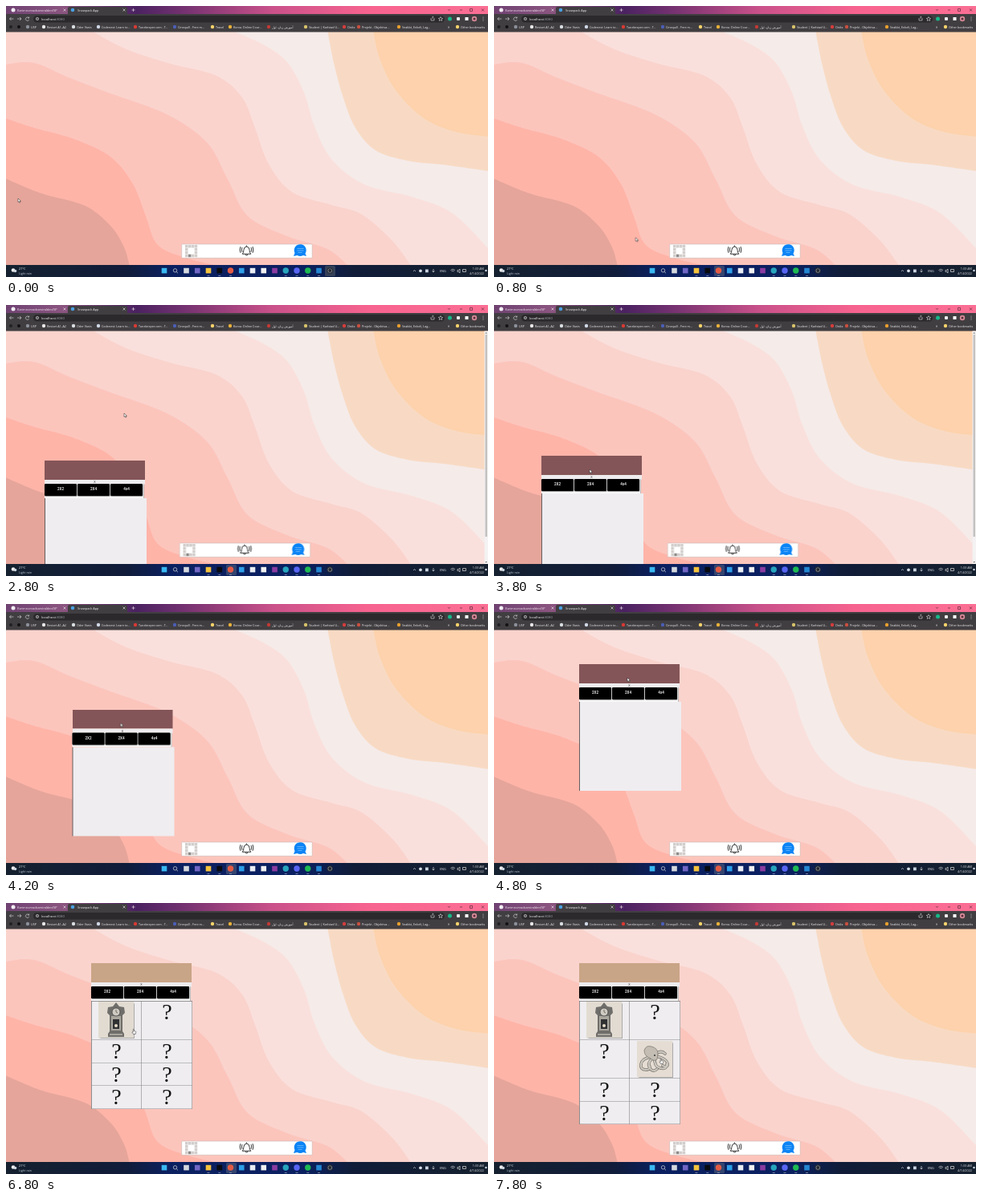
Write an HTML page that moves like this. It is 600 px wide and 338 px high and loops after 8 s.

```html
<!DOCTYPE html>
<html lang="en">
<head>
<meta charset="utf-8">
<title>Desktop memory game</title>
<style>
html, body { margin: 0; width: 100%; height: 100%; overflow: hidden; background: #0b1425; }
#stage { position: relative; width: 600px; height: 338px; overflow: hidden; font-family: "Open Sans", sans-serif; }
#stage > svg { position: absolute; inset: 0; }
text { font-family: "Open Sans", "DejaVu Sans", sans-serif; }
.page { position: absolute; top: 32px; left: 0; width: 600px; height: 291px; overflow: hidden; }
.anim, .window, .header, .board, .card, .blank { animation: 8s step-end infinite; }

.window { position: absolute; width: 127px; height: 157px; animation-name: drag; }
.window > * { position: absolute; box-sizing: border-box; }
.header { width: 125px; height: 23.5px; background: #c9a587; animation-name: press; }
.close { top: 23.5px; width: 125px; height: 6px; background: #eeecee;
  font: 4px/5.4px "Open Sans", sans-serif; text-align: center; color: #222; }
.sizes { top: 29px; width: 124px; height: 17.5px; background: #fafafa; border-right: 1px solid #bbb; }
.sizes b { position: absolute; top: .3px; width: 39.5px; height: 14.5px; border-radius: 1px; background: #000;
  box-shadow: .3px .7px 1px #777; color: #fff; font: 500 4.6px/14.5px Roboto, sans-serif; text-align: center; }
.blank { top: 46.5px; width: 127px; height: 111px; background: #efedf0; border-left: .7px solid #665f61; animation-name: clear; }
.board { top: 47px; width: 126px; display: grid; grid-template-columns: 63px 63px; background: #efedf0;
  box-shadow: inset .8px .8px #777; animation-name: rows; }
.cell { position: relative; box-shadow: inset -.6px -.6px #888;
  font: 28px/28px "Liberation Serif", serif; text-align: center; color: #111; }
.card { position: absolute; left: 9.3px; top: 1.3px; width: 44px; height: 45px; box-shadow: .5px .5px 1px #aaa; }
.clock { animation-name: first; }
.octopus { animation-name: second; }

.recorder { animation-name: recorder; }
.browser { animation-name: browser; }
.dock { animation-name: dock; }
.scrollbar { animation-name: scrollbar; }
.cursor { animation-name: cursor; }
.arrow { animation-name: arrow; }
.hand { animation-name: hand; }

@keyframes recorder { 0% { opacity: 1 } 2.5%, 100% { opacity: 0 } }
@keyframes browser { 0% { opacity: 0 } 2.5%, 100% { opacity: 1 } }
@keyframes dock { 0% { transform: none } 12.5% { transform: translateX(-2.5px) } 50%, 100% { transform: none } }
@keyframes scrollbar { 0% { opacity: 0 } 12.5% { opacity: 1 } 50%, 100% { opacity: 0 } }
@keyframes drag {
  0% { transform: translate(2px, 189px); visibility: hidden }
  12.5% { transform: translate(2px, 189px); visibility: visible }
  25% { transform: translate(22px, 177px) }
  30% { transform: translate(48px, 162px) }
  42.5% { transform: translate(59px, 156px) }
  47.5% { transform: translate(59px, 156px); animation-timing-function: steps(4) }
  57.5%, 100% { transform: translate(106px, 43px); visibility: visible }
}
@keyframes press { 0% { background: #c9a587 } 22.5% { background: #845558 } 75%, 100% { background: #c9a587 } }
@keyframes clear { 0% { opacity: 1 } 75%, 100% { opacity: 0 } }
@keyframes rows {
  0% { opacity: 0; grid-template-rows: 28.5px 28.5px 28.5px 28.5px }
  75% { opacity: 1; grid-template-rows: 28.5px 28.5px 28.5px 28.5px }
  82.5% { opacity: 1; grid-template-rows: 49px 28.5px 28.5px 28.5px }
  92.5%, 100% { opacity: 1; grid-template-rows: 49px 48px 28.5px 28.5px }
}
@keyframes first { 0% { opacity: 0 } 82.5%, 100% { opacity: 1 } }
@keyframes second { 0% { opacity: 0 } 92.5%, 100% { opacity: 1 } }
@keyframes arrow { 0% { opacity: 1 } 72.5%, 100% { opacity: 0 } }
@keyframes hand { 0% { opacity: 0 } 72.5%, 100% { opacity: 1 } }
@keyframes cursor {
  0% { transform: translate(15px, 240px) }
  2.5% { transform: translate(15px, 240px); animation-timing-function: steps(4) }
  12.5% { transform: translate(230px, 305px); animation-timing-function: steps(3) }
  20% { transform: translate(71px, 240px) }
  25% { transform: translate(91px, 228px) }
  30% { transform: translate(117px, 213px); animation-timing-function: steps(2) }
  35% { transform: translate(147px, 135px); animation-timing-function: steps(2) }
  40% { transform: translate(108px, 211px) }
  42.5% { transform: translate(119px, 205px) }
  47.5% { transform: translate(119px, 205px); animation-timing-function: steps(4) }
  57.5% { transform: translate(166px, 92px) }
  60% { transform: translate(166px, 92px); animation-timing-function: steps(5) }
  72.5% { transform: translate(167px, 110px) }
  75% { transform: translate(167px, 110px); animation-timing-function: steps(3) }
  82.5% { transform: translate(158px, 157px) }
  87.5% { transform: translate(158px, 157px); animation-timing-function: steps(2) }
  92.5%, 100% { transform: translate(207px, 194px) }
}
</style>
</head>
<body>
<div id="stage">
  <svg width="600" height="338">
    <defs>
      <linearGradient id="theme">
        <stop offset="0" stop-color="#6f4272"/><stop offset=".12" stop-color="#8b5580"/>
        <stop offset=".27" stop-color="#4b2261"/><stop offset=".36" stop-color="#70306f"/>
        <stop offset=".55" stop-color="#c9518a"/><stop offset=".75" stop-color="#f7638f"/><stop offset="1" stop-color="#fb6f94"/>
      </linearGradient>
      <linearGradient id="bar">
        <stop offset="0" stop-color="#15212f"/><stop offset=".25" stop-color="#101c3a"/>
        <stop offset=".34" stop-color="#0b2060"/><stop offset=".62" stop-color="#0b2060"/>
        <stop offset=".72" stop-color="#101c38"/><stop offset="1" stop-color="#16212f"/>
      </linearGradient>
    </defs>
    <rect y="32" width="600" height="292" fill="#fdd2ac"/>
    <g id="waves"></g>

    <rect width="600" height="11" fill="url(#theme)"/>
    <path d="M77 11V3q0-2 2-2h70q2 0 2 2v8z" fill="#413e41"/>
    <circle cx="9" cy="5" r="2.5" fill="#f0edf2"/>
    <circle cx="83" cy="5" r="2.3" fill="#4b9fe0"/>
    <g fill="none" stroke="#eee" stroke-width=".6">
      <path d="M71.500 3.500l3 3m0-3l-3 3M156.500 5h4m-2-2v4M145.500 3.500l3 3m0-3l-3 3"/>
      <path d="M550 4l1.500 1.500L553 4M565 5h3M577.500 3.500h3v3h-3zM592 3.500l3 3m0-3l-3 3" stroke="#42202e"/>
    </g>
    <rect y="10" width="600" height="22.500" fill="#413e41"/>
    <rect x="34" y="12" width="512" height="8.500" rx="4.200" fill="#2b292c"/>
    <g fill="none" stroke="#ddd" stroke-width=".6">
      <path d="M9.500 16h-5m2-2l-2 2 2 2M14 16h5m-2-2l2 2-2 2M28.500 15a2.200 2.200 0 1 0 .2 2m0-3.500V15H27"/>
      <circle cx="39" cy="16" r="1.700"/><path d="M39 15v2M529 15v3h4v-3m-2 1v-3l1.500 1M541 13.500l.8 1.700 1.900.2-1.400 1.200.4 1.900-1.700-1-1.700 1 .4-1.900-1.400-1.200 1.900-.2z"/>
    </g>
    <circle cx="552.500" cy="16" r="2.500" fill="#17b889"/>
    <rect x="561" y="14" width="4" height="4" rx="1" fill="#eee"/>
    <rect x="571.500" y="14" width="4" height="4" fill="#fff"/>
    <circle cx="583" cy="16" r="3.200" fill="#d98a98"/><circle cx="583" cy="16" r="1.500" fill="#59313d"/>
    <g fill="#ddd"><circle cx="594" cy="14" r=".5"/><circle cx="594" cy="16" r=".5"/><circle cx="594" cy="18" r=".5"/></g>
    <g id="marks"></g>

    <g class="anim scrollbar">
      <rect x="595.500" y="32.500" width="4.500" height="291" fill="#f4f2f2"/>
      <rect x="596.500" y="37" width="2.500" height="252" fill="#c4c1c1"/>
      <path d="M596.500 35.500h2.500l-1.250-1.500zM596.500 320h2.500l-1.250 1.500z" fill="#666"/>
    </g>
    <g class="anim dock">
      <rect x="218.700" y="297" width="162.500" height="17.300" rx=".7" fill="#fff" stroke="#c9b8b4" stroke-width=".6"/>
      <g id="memory"></g>
      <g fill="none" stroke="#222" stroke-width=".9" stroke-linecap="round">
        <path d="M294.500 309q1.400-1.200 1.400-4.500 0-4 3.600-4.500 3.600.5 3.600 4.500 0 3.300 1.400 4.500zM298.200 310.500q1.300 1.400 2.600 0M299.500 299v.7"/>
        <path d="M293.800 301.500q-1.300 2.500 0 5M291.800 300.500q-1.600 3.500 0 7M305.200 301.500q1.300 2.500 0 5M307.200 300.500q1.600 3.500 0 7"/>
      </g>
      <path d="M358 312l1.500-4a7.500 7.500 0 1 1 13 .7l1.500 3.300-4-1a7.500 7.500 0 0 1-7.500 0z" fill="#0b84f5"/>
      <path d="M362.500 302.500h8M362.500 305h8M363.500 307.500h5" stroke="#7fc0fb" stroke-width=".7"/>
    </g>

    <rect y="323" width="600" height="15" fill="url(#bar)"/>
    <circle cx="9" cy="329.500" r="2.300" fill="#eee"/><circle cx="11.500" cy="330.500" r="1.800" fill="#ccd4df"/>
    <rect class="anim recorder" x="397" y="324" width="13" height="13" rx="1.500" fill="#344057"/>
    <rect class="anim browser" x="274" y="324" width="13" height="13" rx="1.500" fill="#34456f"/>
    <g id="apps"></g>
    <g fill="none" stroke="#ddd" stroke-width=".7">
      <circle cx="210.500" cy="329.800" r="2.200"/><path d="M212.200 331.500l1.800 1.800M507 331l1.500-1.500 1.500 1.500"/>
      <path d="M532 328v4m-1.500-1.500l1.500 1.500 1.500-1.500M553.500 329.500q2.700-2.500 5.400 0M554.700 331q1.500-1.500 3 0M562 329.500h1.500l1.500-1.500v5l-1.500-1.500H562zM568.500 328.500h4v3h-4z"/>
    </g>
    <circle cx="516" cy="330.300" r="1.900" fill="#d6dce5"/><rect x="522" y="328.500" width="3.800" height="3.800" fill="#c9d2df"/>
    <circle cx="597.500" cy="330" r="1.200" fill="#dce2ec"/>
    <g id="labels"></g>
  </svg>

  <div class="page">
    <div class="window">
      <div class="blank"></div>
      <div class="board" id="board"></div>
      <div class="header"></div>
      <div class="close">X</div>
      <div class="sizes"><b style="left:.3px">2X2</b><b style="left:41.300px">2X4</b><b style="left:82.300px">4x4</b></div>
    </div>
  </div>

  <svg width="600" height="338">
    <g class="anim cursor" stroke="#222" stroke-width=".5" fill="#fff">
      <path class="anim arrow" d="M0 0v4.600l1.100-1 .8 1.700.9-.4-.8-1.600h1.500z"/>
      <path class="anim hand" d="M.2.600q.6-.9 1.100 0v2l2 .4q.7.300.4 1.500l-.5 2H.500L-1 4.200q.2-.8 1.200 0z"/>
    </g>
  </svg>
</div>

<script>
const byId = id => document.getElementById(id);
const label = (x, y, s, size = 3.9, fill = "#eeeef0", anchor = "start") =>
  `<text x="${x}" y="${y}" font-size="${size}" fill="${fill}" text-anchor="${anchor}">${s}</text>`;
const square = (x, y, size, fill) => `<rect x="${x}" y="${y}" width="${size}" height="${size}" fill="${fill}"/>`;
const dot = (x, y, r, fill) => `<circle cx="${x}" cy="${y}" r="${r}" fill="${fill}"/>`;

// Smooth curve through a few points
function curve(points) {
  const at = i => points[Math.max(0, Math.min(points.length - 1, i))];
  let d = `M${at(0)}`;
  for (let i = 0; i < points.length - 1; i++) {
    const handle = (a, b, c, sign) => [0, 1].map(k => at(a)[k] + sign * (at(c)[k] - at(b)[k]) / 6);
    d += `C${handle(i, i - 1, i + 1, 1)} ${handle(i + 1, i, i + 2, -1)} ${at(i + 1)}`;
  }
  return d;
}

const waves = [
  ["#f8dac4", [[457, 30], [465, 65], [485, 105], [520, 140], [560, 157], [601, 163]]],
  ["#f5ebe9", [[400, 30], [409, 75], [420, 115], [435, 152], [460, 180], [500, 193], [545, 198], [601, 206]]],
  ["#fae0dc", [[280, 30], [320, 48], [350, 70], [371, 108], [384, 150], [406, 192], [447, 223], [505, 238], [555, 258], [601, 303]]],
  ["#fad3cd", [[105, 30], [150, 54], [205, 72], [262, 87], [294, 114], [310, 152], [327, 197], [356, 232], [405, 248], [443, 260], [481, 293], [505, 325]]],
  ["#fcc5bc", [[-1, 73], [35, 71], [80, 90], [130, 109], [200, 135], [250, 170], [276, 216], [301, 262], [350, 287], [400, 303], [427, 325]]],
  ["#ffb4a8", [[-1, 140], [35, 152], [85, 166], [130, 188], [158, 222], [174, 262], [188, 297], [220, 313], [268, 325]]],
  ["#e5a59a", [[-1, 215], [45, 234], [98, 249], [130, 274], [147, 301], [154, 325]]]
];
byId("waves").innerHTML = waves.map(([fill, points]) =>
  `<path d="${curve(points)}L601 330H-1V30z" fill="${fill}"/>`).join("");

const bookmarks = [
  [31, "USP", "#8b9099"], [51, "Restart A1–A2", "#e8e8e8"], [88, "Oder Vanis", "#d8dee0"],
  [119, "Codenest: Learn to...", "#cfd8e6"], [165, "Tunekeeper.com - T...", "#d83a34"],
  [214, "Cinequill - Free m...", "#4b5fb5"], [261, "Travel", "#f5d36b"], [283, "Korva: Online Cour...", "#e9b23a"],
  [331, "آموزش زبان، اول", "#c23a35"], [377, "Student | Karlstad U...", "#d8c36a"],
  [425, "Ordix", "#d43d3d"], [443, "Projekt - Objektiva...", "#c9503f"],
  [493, "Snabbt, Enkelt, Lag...", "#e8a02e"], [566, "Other bookmarks", "#f5d36b"]
];
byId("marks").innerHTML = dot(6, 26, 2, "#202124") + dot(16, 26, 2, "#111") +
  bookmarks.map(([x, s, c]) => dot(x - 4, 26, 2.2, c) + label(x, 27.6, s, 3.7)).join("") +
  label(550, 27.6, "»", 4.5);

let memory = "";
for (let row = 0; row < 4; row++)
  for (let col = 0; col < 4; col++) {
    const inner = row > 0 && row < 3 && col > 0 && col < 3;
    if (!inner) memory += square(223 + col * 3.9, 298 + row * 3.9, 3.5, row === 3 && col === 1 ? "#8e8b89" : "#d2cecc");
  }
byId("memory").innerHTML = memory;

const apps = ["#39b8f2", null, "#d4d8de", "#7166c5", "#f4c33d", "#080b10", "#e35b45", "#2e9fe8",
  "#e9edf3", "#f1f1f1", "#8b3ca0", "#27a5bd", "#5865f2", "#1db954", "#2486d2", "#262b35"];
const round = [6, 11, 12, 13, 15];
byId("apps").innerHTML = apps.map((fill, i) => {
  const x = 197 + i * 13.75;
  if (!fill) return "";
  return round.includes(i) ? dot(x, 330, 3.7, fill) : square(x - 3.3, 326.8, 6.6, fill);
}).join("") + dot(403.2, 330, 2.6, "#8d939e") + dot(403.2, 330, 1.9, "#20242c") +
  [4, 5, 6, 11, 12, 13, 14].map(i => `<rect x="${195.5 + i * 13.75}" y="336.3" width="3" height=".7" fill="#9daac0"/>`).join("");

byId("labels").innerHTML =
  label(14, 6.6, "Karimnorvadsamiralden/SP", 3.9, "#f0e8ee") + label(89, 6.6, "Snowpack App") +
  label(44, 17.6, "localhost<tspan fill='#9aa0a6'>:8080</tspan>", 4.3) +
  label(16, 329.3, "27°C", 3.9) + label(16, 334.8, "Light rain", 3.7, "#bfc6d2") +
  label(540, 331.7, "ENG", 3.8) +
  label(595, 329.3, "1:33 AM", 3.8, "#e3e3e5", "end") + label(595, 334.8, "4/14/2022", 3.8, "#e3e3e5", "end");

const clock = `<svg class="card clock" viewBox="0 0 44 45"><rect width="44" height="45" fill="#e2dbd1"/>
  <path d="M12 44v-4l2-3V17l-3-3 1-7 6-1 4-5 4 5 6 1 1 7-3 3v20l2 3v4z" fill="#6f6e6a"/>
  <path d="M16 18h12v18H16zM14 40h16v2H14z" fill="#a9a69e"/><path d="M18 22h8v12h-8z" fill="#303133"/>
  <circle cx="22" cy="13" r="5" fill="#cfcbc2" stroke="#444" stroke-width=".8"/>
  <path d="M22 10v3l2 1M22 24v5" stroke="#333" stroke-width=".6" fill="none"/>
  <circle cx="22" cy="30" r="2" fill="#e4dcc8"/></svg>`;

const arms = "M17 20Q6 22 5 29t6 7 4-6M19 22q-7 6-3 12t9 1M22 21q-1 11 7 13t8-5M24 19q13 3 14 9t-6 3M24 16q6-5 11 0";
const octopus = `<svg class="card octopus" viewBox="0 0 44 45"><rect width="44" height="45" fill="#e5ddd3"/>
  <g fill="none" stroke-linecap="round"><path d="${arms}" stroke="#77736e" stroke-width="3.600"/>
  <path d="${arms}" stroke="#cdc8bf" stroke-width="2.200"/></g>
  <path d="M9 12q2-7 9-5 8 2 8 9l-1 7q-4 3-8-1-8-3-8-10z" fill="#c3bdb4" stroke="#77736e" stroke-width=".7"/>
  <circle cx="22" cy="18" r="1" fill="#333"/></svg>`;
const cards = { 0: clock, 3: octopus };
byId("board").innerHTML = Array.from({ length: 8 }, (_, i) => `<div class="cell">?${cards[i] || ""}</div>`).join("");
</script>
</body>
</html>
```
